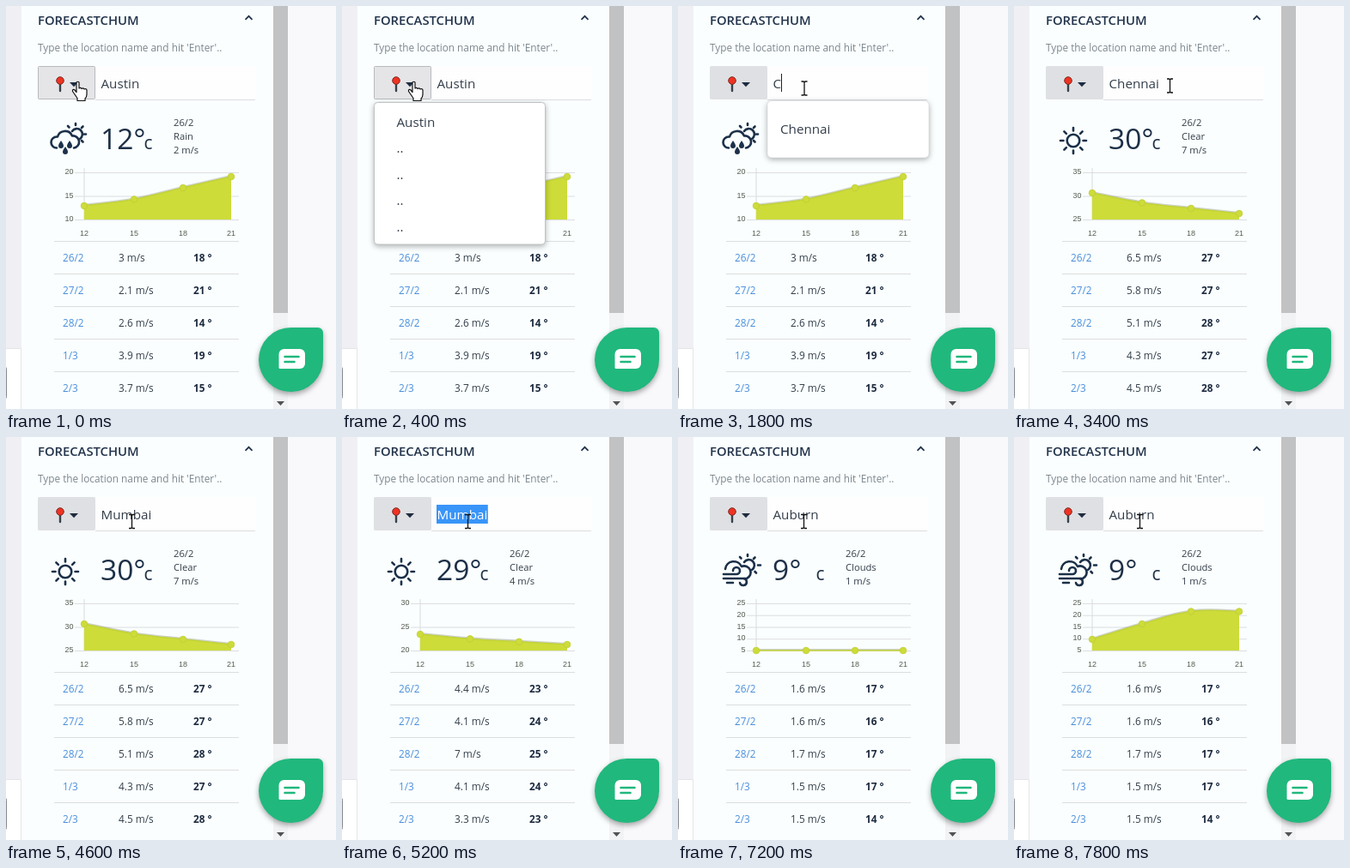
An HTML page that plays this animation: 384x470 px, repeating every 8000 ms.

```html
<!DOCTYPE html>
<html lang="en">
<head>
<meta charset="utf-8">
<title>Weather panel</title>
<style>
  html, body { margin: 0; width: 100%; height: 100%; overflow: hidden; background: #f9f9fb; }
  svg { display: block; width: 100vw; height: 100vh; }
  text { font-family: "Open Sans", "Noto Sans", sans-serif; fill: #333e4a; white-space: pre; }
  .title { font-size: 14.8px; font-weight: 600; fill: #22344c; }
  .hint { font-size: 11.8px; fill: #7d868e; }
  .field { font-size: 15.2px; }
  .info { font-size: 11.2px; }
  .row { font-size: 11.8px; }
  .date { fill: #4a8fdc; }
  .temp { font-weight: 700; fill: #1d2b40; }
  .degrees { font-size: 33.5px; fill: #1d2f47; }
  .unit { font-size: 21px; fill: #1d2f47; }
  .axis { font: 9px "Liberation Sans", Arial, sans-serif; fill: #555b51; }
  .rule { stroke: #dcdee1; }
  .icon { fill: none; stroke: #1c3049; stroke-width: 2.6; stroke-linecap: round; stroke-linejoin: round; }
  .icon .solid { fill: #1c3049; stroke: none; }
  .card { fill: #fff; filter: drop-shadow(0 2px 3px rgba(0, 0, 0, .3)); }
</style>
</head>
<body>
<svg viewBox="0 0 384 470" preserveAspectRatio="none">
  <rect width="384" height="470" fill="#f9f9fb"/>
  <rect width="18" height="399" fill="#f0f0f4"/>
  <path d="M0 399h17v71H0z" fill="#fff"/>
  <path d="M0 399.5h17.500V470" fill="none" stroke="#e4e5e9"/>
  <path d="M0 421.5q.5 0 .5 2v32q0 2-.5 2" fill="none" stroke="#85898f"/>
  <rect x="18" width="293" height="470" fill="#fafefe"/>
  <rect x="311" width="17" height="470" fill="#f2f3f4"/>
  <rect x="311" width="17" height="358" fill="#c1c2c4"/>
  <path d="M315 461h9l-4.500 5z" fill="#505356"/>

  <text class="title" x="37" y="21.500">FORECASTCHUM</text>
  <path d="M278.500 15.800l4-4 4 4" fill="none" stroke="#22344c" stroke-width="1.8"/>
  <text class="hint" x="37" y="53">Type the location name and hit 'Enter'..</text>

  <rect x="104" y="70" width="187" height="39" fill="#fefefe"/>
  <path class="rule" d="M104 109.500h186"/>
  <rect id="button" x="37.500" y="70.500" width="66" height="38" rx="1"/>
  <path d="M63 90v9" stroke="#38424a" stroke-width="2.4" stroke-linecap="round"/>
  <circle cx="63" cy="87" r="4.300" fill="#ee3322" stroke="#7b2b25"/>
  <path d="M74 89h10l-5 5.300z" fill="#1d2b40"/>
  <rect id="selection" x="110" y="79" height="22" fill="#3995f8"/>
  <text id="entry" class="field" x="110.500" y="96"></text>
  <path id="caret" stroke="#222" d="M0 79v21"/>

  <g id="rain" class="icon">
    <path d="M59 165.500a6.500 6.500 0 0 1 0-13h1a9 9 0 0 1 17-1 7 7 0 0 1 2 14"/>
    <path d="M77 146a6.500 6.500 0 1 1 9 9M81 137v2M72 140l1.500 1.500M89.500 140.500l-1.500 1.500M91 149.500h2M89.500 158.500l-1.500-1.500"/>
    <path class="solid" d="M64 157q3 4 3 6a3 3 0 0 1-6 0q0-2 3-6zM74 157q3 4 3 6a3 3 0 0 1-6 0q0-2 3-6zM69 164q3 4 3 6a3 3 0 0 1-6 0q0-2 3-6z"/>
  </g>
  <g id="sun" class="icon">
    <circle cx="69" cy="157" r="7.300"/>
  </g>
  <g id="wind" class="icon">
    <path d="M55 154a10 10 0 0 1 19-3 7.500 7.500 0 0 1 6 14h-3"/>
    <path d="M53 160h15a4 4 0 1 0-4-4M53 165h23a4 4 0 1 1-4 5M57 170h7"/>
    <path d="M77 146a6.500 6.500 0 1 1 9 9M81 137v2M72 140l1.500 1.500M89.500 140.500l-1.500 1.500M93 149.500h3M91 158.500l-1.500-1.500"/>
  </g>
  <text id="degrees" class="degrees" x="110" y="167"></text>
  <text class="unit" x="160.500" y="167">c</text>
  <text class="info" x="195" y="140">26/2</text>
  <text id="sky" class="info" x="195" y="156"></text>
  <text id="wind-now" class="info" x="195" y="172"></text>

  <g id="grid"></g>
  <path d="M91 189v60" stroke="#d9dcdc"/>
  <path id="area" fill="#cddc39"/>
  <path id="shade" fill="none" stroke="#777b60" stroke-opacity=".35" stroke-width="2.200" transform="translate(0 -1)"/>
  <path id="line" fill="none" stroke="#c3d335" stroke-width="1.500"/>
  <g id="dots" fill="#cddc39" stroke="#bfce35" stroke-width=".8"></g>
  <g id="hours"></g>
  <g id="rows"></g>

  <g id="menu">
    <rect class="card" x="37.500" y="112.500" width="199" height="165.500" rx="4" stroke="#bfc2c4"/>
    <text class="field" x="63.500" y="141">Austin</text>
  </g>
  <g id="hintbox">
    <rect class="card" x="104" y="110.500" width="188" height="66.500" rx="5" stroke="#d4d6d8" stroke-width=".6"/>
    <text class="field" x="119" y="149">Chennai</text>
  </g>

  <path d="M331.500 375H363a6 6 0 0 1 6 6v31.500a37.500 37.500 0 1 1-37.500-37.500z" fill="#20b87d" style="filter:drop-shadow(0 3px 3px rgba(0,0,0,.35))"/>
  <path d="M324 400h18a6 6 0 0 1 6 6v11a6 6 0 0 1-6 6h-23a1.500 1.500 0 0 1-1.500-1.500V406a6 6 0 0 1 6-6z" fill="#fff"/>
  <path d="M324.500 409h16M324.500 415h11" stroke="#20b87d" stroke-width="2.600" stroke-linecap="round"/>

  <path id="hand" fill="#fff" stroke="#111" stroke-width="1.200" stroke-linejoin="round"
    d="M-5-9.500q2-1.500 3 0v7q2-1.500 3 .5 2-1.500 3 .5 2.500-1 3 1v5q0 3-2 5v2.500H-4V9l-5.500-8q-.5-2.500 2-2l2.500 3z"/>
  <path id="beam" fill="none" stroke="#111" stroke-width="1.300" d="M-3.500-8h2.500l1 1 1-1h2.500M0-7v14M-3.500 8h2.500l1-1 1 1h2.500"/>
</svg>
<script>
const LOOP = 8000, STEP = 200, BASE = 249;
const HOURS = [[91, 12], [149, 15], [206, 18], [262, 21]];
const DATES = ["26/2", "27/2", "28/2", "1/3", "2/3"];

const CITIES = [
  { start: -2000, icon: "rain", now: 12, sky: "Rain", wind: 2, ticks: [20, 15, 10],
    heights: [233, 225.5, 212, 199], winds: [3, 2.1, 2.6, 3.9, 3.7], temps: [18, 21, 14, 19, 15] },
  { start: 2800, icon: "sun", now: 30, sky: "Clear", wind: 7, ticks: [35, 30, 25],
    heights: [218, 229.5, 236, 242], winds: [6.5, 5.8, 5.1, 4.3, 4.5], temps: [27, 27, 28, 27, 28] },
  { start: 5000, icon: "sun", now: 29, sky: "Clear", wind: 4, ticks: [30, 25, 20],
    heights: [199, 213, 222, 230.5], winds: [4.4, 4.1, 7, 4.1, 3.3], temps: [23, 24, 25, 24, 23] },
  { start: 7200, icon: "wind", now: 9, sky: "Clouds", wind: 1, ticks: [25, 20, 15, 10, 5],
    heights: [236, 218, 203.5, 203.5], winds: [1.6, 1.6, 1.7, 1.5, 1.5], temps: [17, 16, 17, 17, 14] }
];

// [time, text, mode]
const ENTRIES = [
  [0, "Austin"], [1400, "Austin", "select"], [1800, "C", "caret"], [2000, "Che", "caret"],
  [2200, "Chenn", "caret"], [2400, "Chennai", "caret"], [2800, "Chennai"],
  [3600, "Chennai", "select"], [3800, "Mumb", "caret"], [4000, "Mumbai", "caret"],
  [4600, "Mumbai"], [5200, "Mumbai", "select"], [6400, "A", "caret"],
  [6600, "Aub", "caret"], [6800, "Auburn", "caret"], [7200, "Auburn"]
];
// [time, x, y, shape]
const POINTER = [
  [0, 87, 98.5, "hand"], [800, 95, 96, "hand"], [1000, 122, 92, "beam"], [1200, 147, 91.5, "beam"],
  [1400, 147, 96, "beam"], [3000, 166, 94, "beam"], [3200, 181.5, 93, "beam"],
  [3600, 146.5, 98.5, "beam"]
];

const $ = id => document.getElementById(id);
const show = (id, on) => { $(id).style.display = on ? "" : "none"; };
const latest = (list, t) => list.filter(item => item[0] <= t).pop();
const label = (cls, x, y, text, anchor = "start") =>
  `<text class="${cls}" x="${x}" y="${y}" text-anchor="${anchor}">${text}</text>`;

$("sun").innerHTML += Array.from({ length: 8 }, (_, i) =>
  `<path d="M69 145.500v-3.500" transform="rotate(${i * 45} 69 157)"/>`).join("");
$("menu").innerHTML += [171, 202, 232, 263].map(y => label("field", 63.5, y, "..")).join("");
$("hours").innerHTML = HOURS.map(([x, h]) => label("axis", x, 268, h, "middle")).join("");

function showCity(city) {
  for (const id of ["rain", "sun", "wind"]) show(id, id === city.icon);
  $("degrees").textContent = city.now + "°";
  $("sky").textContent = city.sky;
  $("wind-now").textContent = city.wind + " m/s";
  $("grid").innerHTML = city.ticks.map((tick, i) => {
    const y = 194.5 + i * 55 / (city.ticks.length - 1);
    return `<path class="rule" d="M80 ${y}h191"/>` + label("axis", 78.5, y + 1.5, tick, "end");
  }).join("");
  $("rows").innerHTML = DATES.map((date, i) => {
    const y = 298 + i * 38;
    return `<path class="rule" d="M56 ${y - 23.5}h215"/>` + label("row date", 66, y, date) +
      label("row", 131, y, city.winds[i] + " m/s") + label("row temp", 218, y, city.temps[i] + " °");
  }).join("");
}

function spline(points) {
  const control = (i, sign) => {
    const a = points[Math.max(i - 1, 0)], b = points[Math.min(i + 1, points.length - 1)];
    return points[i].map((v, k) => v + sign * 0.2 * (b[k] - a[k]));
  };
  return points.map((p, i) => i ? `C${control(i - 1, 1)} ${control(i, -1)} ${p}` : `M${p}`).join("");
}

function drawChart(city, t) {
  const grow = Math.min(1, (t - city.start) / 450) ** 1.2;
  const points = HOURS.map(([x], i) => [x, BASE + (city.heights[i] - BASE) * grow]);
  const curve = spline(points);
  $("line").setAttribute("d", curve);
  $("shade").setAttribute("d", curve);
  $("area").setAttribute("d", `${curve}V${BASE}H91z`);
  $("dots").innerHTML = points.map(([x, y]) => `<circle cx="${x}" cy="${y}" r="3.800"/>`).join("");
}

function drawEntry(t) {
  const [, text, mode] = latest(ENTRIES, t);
  const entry = $("entry");
  entry.textContent = text;
  entry.style.fill = mode === "select" ? "#fff" : "";
  const width = entry.getComputedTextLength();
  $("selection").setAttribute("width", width + 1);
  $("caret").setAttribute("transform", `translate(${Math.round(110 + width) + 0.5})`);
  show("selection", mode === "select");
  show("caret", mode === "caret");
}

function drawPointer(t) {
  const [, x, y, shape] = latest(POINTER, t);
  for (const id of ["hand", "beam"]) show(id, id === shape);
  $(shape).setAttribute("transform", `translate(${x} ${y})`);
}

let shownCity, shownTime;
function render(t) {
  const city = CITIES.filter(c => c.start <= t).pop();
  if (city !== shownCity) showCity(shownCity = city);
  drawChart(city, t);
  drawEntry(t);
  drawPointer(t);
  const active = t < 1400;
  $("button").setAttribute("fill", active ? "#e5e5e8" : "#dfe0e3");
  $("button").setAttribute("stroke", active ? "#b8babd" : "#dfe0e3");
  show("menu", t >= 400 && active);
  show("hintbox", t >= 1800 && t < 2400);
}

const origin = performance.now();
function tick() {
  const elapsed = (performance.now() - origin) % LOOP;
  const t = Math.floor(elapsed / STEP) * STEP;
  if (t !== shownTime) render(shownTime = t);
  requestAnimationFrame(tick);
}
tick();
</script>
</body>
</html>
```
